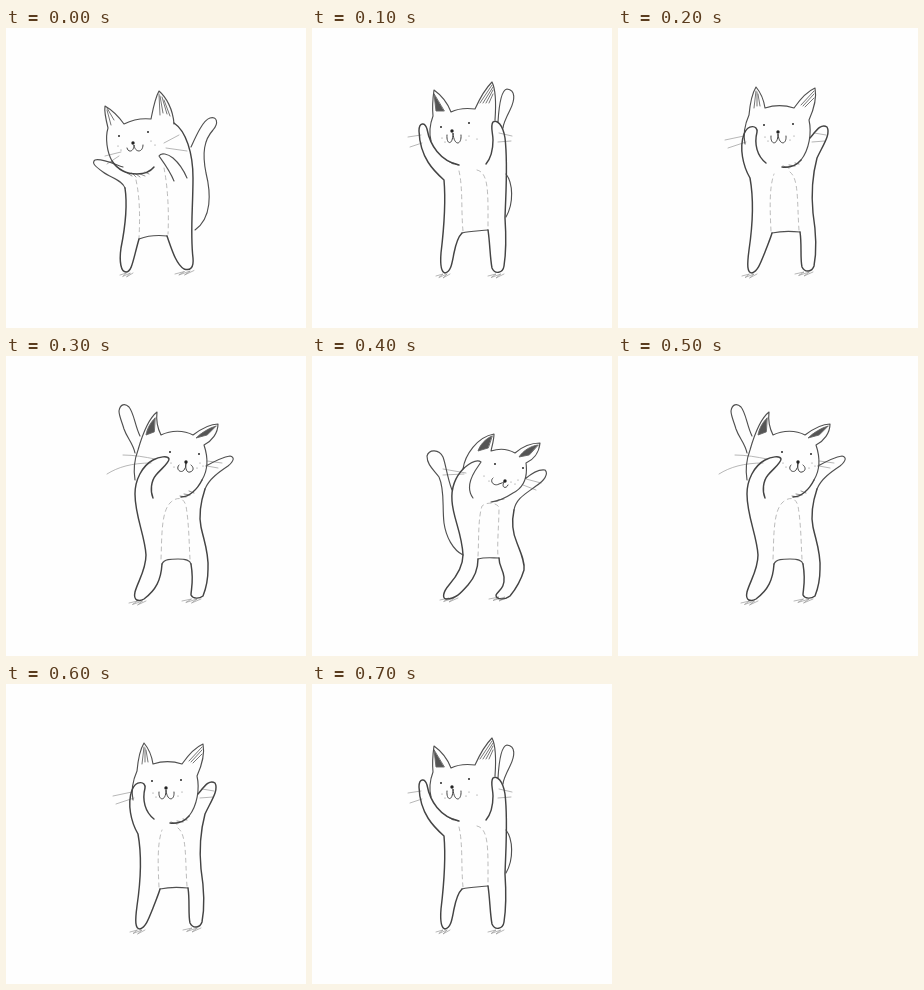
These frames come from a looping animation (300 px wide and 300 px high, 800 ms). An HTML page:

```html
<!DOCTYPE html>
<html lang="en">
<head>
<meta charset="utf-8">
<title>Dancing cat</title>
<style>
html, body { margin: 0; width: 100%; height: 100%; overflow: hidden; background: #fefefe; }
svg { display: block; width: 100%; height: 100%; }
path { fill: none; stroke: #505050; stroke-width: 1.15; stroke-linecap: round; stroke-linejoin: round; }
.bold { stroke: #444; stroke-width: 1.45; }
.thin { stroke: #999; stroke-width: .7; }
.dash { stroke: #aaa; stroke-width: .8; stroke-dasharray: 4 4; }
.ear { fill: #555; stroke: #666; stroke-width: .9; }
.hatch { stroke: #777; stroke-width: .8; }
.face { stroke: #444; stroke-width: 1; }
.eyes { stroke: #333; stroke-width: 2.1; }
.nose { stroke: #222; stroke-width: 3.4; }
.freckles { stroke: #777; stroke-width: 1.1; }
</style>
</head>
<body>
<svg id="stage" viewBox="0 0 300 300"></svg>
<script>
const dots = list => list.map(([x, y]) => `M${x},${y}h.01`).join('');
const scribble = (x, y, w, rise = 0) =>
  `M${x},${y}l${w * .5},${-2 + rise / 2}l${-w * .3},3.5l${w * .6},${-3.5 + rise / 2}l${-w * .3},4l${w * .5},${-4 + rise / 2}`;

const poses = [
  { // leaning left, tail on the right
    line: `M102,100C99,110 101,124 106,133M118,96C126,92 136,90 145,91
      M102,100C100,92 98,84 99,78C106,82 113,89 118,96M145,91C147,81 149,70 153,63C160,69 167,81 168,96
      M117,139C108,136 95,130 89,132C85,135 90,139 97,144C105,150 116,152 119,160
      M161,208C152,207 141,208 133,211
      M168,153C164,143 158,135 153,128C155,124 162,126 167,130C174,136 178,143 181,150
      M185,119C190,108 197,92 204,90C211,88 213,95 207,102C198,112 196,125 200,145C205,165 206,190 189,202`,
    bold: `M168,95C180,103 187,125 187,150C187,180 184,205 187,230C188,240 184,243 178,241C170,236 166,222 161,208
      M119,160C122,180 119,200 115,220C113,234 115,244 120,244C126,244 127,232 133,211
      M106,133C112,142 121,146 131,146C138,146 144,144 148,139`,
    thin: 'M99,128L115,124M101,136L113,128M158,115L173,107M160,120L181,123'
      + scribble(114, 247, 13) + scribble(169, 246, 19, -1),
    dash: 'M130,152C134,170 134,190 133,210M158,140C162,160 163,185 162,206',
    ear: 'M101,82L105,97M101,80L108,92M153,66L154,87M154,68L157,85M156,69L161,86M158,72L164,88',
    hatch: 'M121,145l5,3M126,145l4,4M130,146l4,3M134,146l5,2M139,144l4,2',
    eyes: [[113, 108], [142, 104]], nose: [127, 115],
    face: 'M121,120C122,125 128,124 128,117C129,125 137,125 137,117',
    freckles: [[112, 118], [115, 122], [145, 113], [149, 117]]
  },
  { // upright, both arms up
    line: `M121,88C118,96 117,105 119,113M139,84C147,80 155,80 163,81
      M121,88C120,78 121,69 122,62C129,67 136,76 139,84M163,81C168,70 174,60 180,54C184,62 184,78 183,92
      M150,205C158,203 167,203 176,202
      M186,94C187,77 189,62 195,61C204,62 203,72 198,82C194,90 191,97 191,100M194,146C201,155 202,175 194,189`,
    bold: `M132,152C122,143 108,130 107,103C107,94 113,94 115,101C118,117 128,133 147,137
      M132,152C134,175 132,200 129,225C128,238 129,244 133,245C139,244 140,235 142,225C144,215 147,208 150,205
      M176,202C178,215 178,230 180,240C183,247 191,245 192,238C194,225 194,205 193,190C194,160 196,135 193,110C191,97 185,91 181,94C178,98 181,105 181,112C181,122 179,130 174,136`,
    thin: 'M96,109L109,107M98,119L110,115M187,105L200,108M186,114L199,113'
      + scribble(124, 248, 14) + scribble(176, 248, 16),
    dash: 'M147,143C151,160 149,182 151,203M165,142C177,145 176,165 176,200',
    ear: 'M122,66L124,83L132,83ZM180,57L168,75M181,59L171,75M181,62L174,75M181,66L177,75',
    hatch: 'M136,133l5,3M141,135l5,2',
    eyes: [[129, 99], [157, 95]], nose: [140, 103],
    face: 'M135,107C134,117 141,118 141,105C142,119 150,117 149,107',
    freckles: [[130, 110], [133, 114], [154, 112], [157, 108], [165, 111]]
  },
  { // swinging over to the right
    line: `M131,87C127,96 125,106 127,116M147,80C156,77 167,77 176,80
      M131,87C132,76 135,64 138,59C143,65 146,73 147,80M176,80C183,70 190,63 197,60C199,70 195,83 191,92
      M154,205C163,203 173,203 182,204
      M191,92C194,105 191,122 183,132`,
    bold: `M132,150C125,138 121,120 126,106C130,96 140,97 139,104C136,116 139,128 148,135
      M132,150C136,172 135,195 131,222C129,237 129,245 134,245C140,243 143,234 147,224C150,216 153,209 154,205
      M182,204C184,217 182,230 184,239C187,245 194,244 196,238C199,222 198,204 195,185C193,164 195,145 199,130C205,117 213,106 209,99C203,95 198,103 192,110
      M183,132C178,138 172,140 164,139`,
    thin: 'M107,112L126,108M110,120L128,114M196,105L208,107M194,114L207,113'
      + scribble(124, 248, 15) + scribble(177, 246, 18),
    dash: 'M153,203C152,182 151,160 156,146M172,144C181,151 179,175 181,202',
    ear: 'M138,63L136,80M139,64L139,78M140,66L142,78M196,63L183,77M196,66L185,78M196,70L187,79',
    hatch: 'M165,138l6,2M171,137l6,1M177,135l4,1',
    eyes: [[146, 97], [175, 96]], nose: [160, 104],
    face: 'M153,108C152,117 160,118 160,106C161,118 169,117 168,108',
    freckles: [[147, 109], [150, 113], [172, 112], [176, 108]]
  },
  { // leaning right, tail on the left
    line: `M129,124C127,112 129,102 132,94C136,80 142,63 151,56C150,64 152,73 155,79C165,74 178,74 187,79
      C195,73 203,68 212,68C212,77 206,85 198,89C202,101 202,114 196,124
      M200,110C209,105 217,101 224,100C229,101 228,105 222,110C213,116 203,123 199,133
      M156,208C158,203 165,203 172,203C180,203 184,204 185,208
      M129,97C127,87 121,82 118,73C116,66 113,60 113,55C114,48 119,47 123,51C128,57 129,70 134,80`,
    bold: `M147,142C144,135 145,125 150,119C156,112 163,107 163,103C162,99 153,101 147,104C136,110 129,124 129,138
      C129,160 139,180 140,199C140,214 132,225 129,236C127,245 133,246 138,243C150,234 155,224 156,208
      M199,133C194,148 193,161 195,171C198,185 203,197 202,213C202,225 199,235 197,240C193,243 187,243 185,239C185,233 188,226 185,208
      M196,124C191,134 183,141 175,141`,
    thin: 'M101,118C112,111 126,107 145,107M117,99C128,99 139,101 149,103M201,105L216,107M201,110L212,112'
      + scribble(123, 247, 17) + scribble(176, 245, 19),
    dash: 'M155,203C156,180 155,155 165,146C172,140 178,142 180,150C183,168 183,186 184,203',
    ear: 'M149,62C144,67 141,73 140,79L148,76ZM210,70C203,72 195,77 190,82L201,79Z',
    hatch: 'M174,140l6,1M178,138l6,1M183,135l5,2',
    eyes: [[164, 96], [193, 98]], nose: [180, 106],
    face: 'M173,109C169,113 175,118 178,114Q180,112 180,107C179,113 181,117 184,116C188,115 188,111 185,109',
    freckles: [[165, 107], [168, 111], [191, 112], [194, 107], [197, 110]]
  },
  { // crouched far right
    line: `M151,113C153,99 165,81 182,78C182,84 180,90 179,95C188,92 196,93 203,97
      C211,90 219,87 228,87C227,97 221,104 214,107C216,122 211,132 201,137C195,141 187,145 179,146
      M213,123C220,117 227,113 233,114C237,118 232,125 224,130C215,137 204,142 202,154
      M166,203C173,201 180,202 187,202
      M161,142C155,134 157,125 163,115Q167,109 169,106C165,103 158,107 152,112
      M151,199C141,194 134,181 132,167C130,150 133,134 127,121C122,114 115,109 115,100C117,93 127,93 131,101C134,109 135,121 140,134`,
    bold: `M152,112C143,121 139,132 140,145C141,162 150,177 151,199C151,211 144,221 137,229C131,236 130,242 134,243C144,243 149,237 156,229C163,221 166,213 166,203
      M202,154C199,168 201,178 205,187C209,197 213,206 212,214C209,224 203,234 198,240C193,244 184,244 184,239C187,234 193,232 192,221C191,213 187,210 187,202`,
    thin: 'M131,113L154,117M131,119L152,118M214,123L229,127M211,129L224,134'
      + scribble(128, 244, 18) + scribble(177, 243, 20),
    dash: 'M166,200C167,181 166,163 170,150C175,146 183,146 187,151C187,168 185,186 186,201',
    ear: 'M180,80C173,83 168,89 166,95L176,92ZM226,89C218,90 211,95 207,101L217,99Z',
    hatch: 'M180,146l6,-1M186,144l6,-1',
    eyes: [[183, 108], [211, 112]], nose: [193, 125],
    face: 'M181,122C177,125 182,131 187,128Q191,127 193,125C188,131 194,134 196,129',
    freckles: [[172, 120], [177, 125], [203, 128], [206, 124], [199, 126]]
  }
];

const order = [0, 1, 2, 3, 4, 3, 2, 1];
const layers = ['thin', 'dash', 'hatch', 'ear', 'line', 'bold', 'face', 'freckles', 'eyes', 'nose'];
const stage = document.getElementById('stage');

function markup(pose) {
  const shapes = {
    ...pose,
    eyes: dots(pose.eyes),
    nose: dots([pose.nose]),
    freckles: dots(pose.freckles)
  };
  return `<g>${layers.map(name => `<path class="${name}" d="${shapes[name]}"/>`).join('')}</g>`;
}

stage.innerHTML = poses.map(markup).join('');
const groups = [...stage.children];

function draw() {
  const current = order[Math.floor(performance.now() / 100) % order.length];
  groups.forEach((g, i) => g.setAttribute('display', i === current ? 'inline' : 'none'));
  requestAnimationFrame(draw);
}
draw();
</script>
</body>
</html>
```
